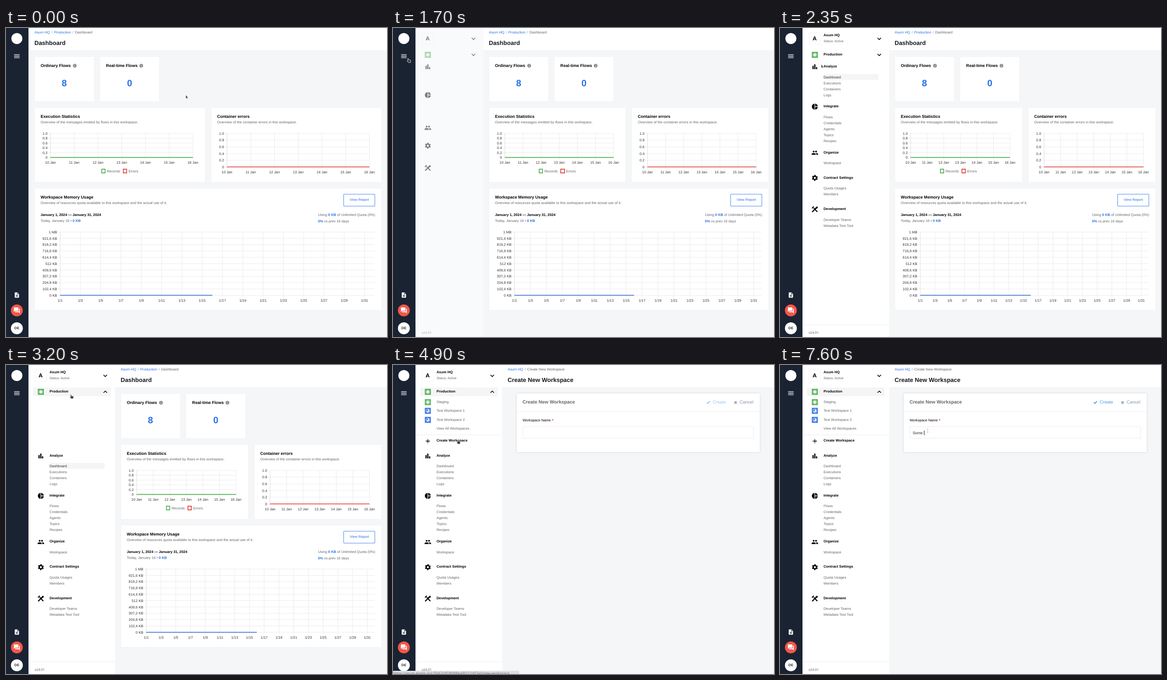
Recreate the animation shown at these times as an HTML page. Size 831 by 674 pixels, loop 8 s.

```html
<!DOCTYPE html>
<html lang="en">
<head>
<meta charset="utf-8">
<title>Dashboard</title>
<style>
@property --off { syntax: "<length>"; inherits: true; initial-value: 0px; }
@property --p { syntax: "<number>"; inherits: true; initial-value: 0; }
@property --a { syntax: "<number>"; inherits: true; initial-value: 0; }
html, body { margin: 0; width: 100%; height: 100%; overflow: hidden; }
#stage {
  position: relative; width: 831px; height: 674px; overflow: hidden; background: #f5f6f8;
  font: 7.76px "Liberation Sans", Arial, sans-serif; color: #000;
  text-rendering: geometricPrecision;
  animation: drawer 8s linear infinite;
}
#stage div, #stage svg, i { position: absolute; box-sizing: border-box; }
i { font-style: normal; line-height: 0; white-space: pre; margin-top: .2px; }
svg { overflow: visible; left: 0; top: 0; }
.b, b { font-weight: 700; }
.c { transform: translateX(-50%); }
.g { color: #63666b; }
.blue, b { color: #2970e8; }
.h { font-weight: 700; font-size: 9.05px; }
.title { font-weight: 700; font-size: 13px; color: #16181d; }
.num { font-weight: 700; font-size: 20px; color: #2970e8; }
.crumbs u { text-decoration: none; color: #2970e8; }
.crumbs s { text-decoration: none; color: #888; margin: 0 3.3px; }
#bar { left: 0; top: 0; width: 49px; height: 674px; background: #1a2332; }
#main { left: calc(49.5px + var(--off)); right: 0; top: 0; bottom: 0; }
.head { left: 0; right: 0; top: 0; height: 49px; background: #fff; box-shadow: 0 .5px 1px #eceef1; }
.fill { inset: 0; }
.card { background: #fff; box-shadow: 0 0 1px rgba(0,0,0,.08); }
.half { top: 174px; height: 161.5px; width: calc((100% - 39.5px) / 2); }
.legend { left: 0; right: 0; top: 133.5px; height: 9px; display: flex; justify-content: center; align-items: center; gap: 3px; color: #666; }
.legend span { width: 9.4px; height: 9.4px; box-shadow: inset 0 0 0 1.65px; }
.legend em { font-style: normal; margin-right: 3px; }
.axis { fill: #333; }
.btn { right: 26px; top: 362px; width: 69px; height: 27px; border: 1px solid #4a86ec; border-radius: 1px; }
#drawer {
  --k: calc(.71 + .29 * var(--p) * var(--p));
  left: 49.5px; top: 0; bottom: 0; width: var(--off); overflow: hidden;
  background: #fff; opacity: var(--a);
}
.fade { opacity: var(--p); }
.sub {
  --h: calc(.5px + 12.5px * var(--p));
  left: 45.5px; width: 120px; height: var(--h); line-height: var(--h);
  overflow: hidden; transform: translateY(-50%); color: #63666b;
}
.sel { background: #f5f5f6; color: #333; }
#groups { left: 0; top: 84px; width: 188px; height: 0; animation: expand 8s step-end infinite; }
.rule { left: 0; right: 0; border-top: 1px solid #eeeef0; }
.ver { font: 7.2px/0 "Open Sans", "Noto Sans", sans-serif; color: #555; }
#form { left: 32.5px; right: 31px; top: 62px; height: 127.5px; background: #fff; border-radius: 2px; box-shadow: 0 0 4px rgba(0,0,0,.14); }
.act { font-size: 9.7px; color: #4a98ea; }
.field { left: 12.5px; right: 13.5px; top: 72px; height: 26px; border: 1px solid #ececee; }
.typed { font-size: 8.31px; color: #222; }
.typed::after { content: ""; position: absolute; left: calc(100% + .3px); top: -5px; height: 10px; border-left: 1px solid #111; }
#status {
  left: 0; top: 666.5px; width: 275px; height: 12px; background: #dddfe2; border-radius: 0 2px 0 0;
  font: 7.7px "Noto Sans", "Open Sans", sans-serif; color: #6b6e72;
  animation: link 8s linear infinite;
}
#cursor { left: 0; top: 0; width: 0; height: 0; animation: move 8s linear infinite; }
#cursor path { fill: #3c3f44; stroke: #fff; stroke-width: .7; }
@keyframes drawer {
  0%, 20% { --off: 0px; --a: 0; --p: 0; animation-timing-function: step-end; }
  20.625% { --off: 70px; --a: .2; animation-timing-function: step-end; }
  21.25% { --off: 147px; --a: .48; animation-timing-function: step-end; }
  21.875% { --off: 178px; --a: .8; animation-timing-function: step-end; }
  22.5% { --off: 188px; --a: 1; }
  23.5% { --p: 0; }
  24.375% { --p: .13; }
  28.125%, 100% { --off: 188px; --a: 1; --p: 1; }
}
@keyframes expand { 0% { top: 84px; } 40%, 100% { top: 197.5px; } }
@keyframes link { 0%, 55.6% { opacity: 0; } 57.5%, 70.7% { opacity: 1; } 73%, 100% { opacity: 0; } }
@keyframes move {
  0%, 6.3% { transform: translate(392px, 146px); animation-timing-function: ease-in-out; }
  16.25%, 23.1% { transform: translate(33px, 66px); }
  24.375% { transform: translate(39px, 67px); }
  30.6%, 31.3% { transform: translate(102px, 82px); animation-timing-function: ease-out; }
  36.25%, 45.6% { transform: translate(141.5px, 64px); }
  47.5%, 49.4% { transform: translate(145px, 102px); }
  51.25%, 53.75% { transform: translate(145px, 142px); }
  54.375%, 64.4% { transform: translate(141px, 163px); animation-timing-function: ease-in-out; }
  70.625% { transform: translate(306.5px, 145px); }
  74.375%, 100% { transform: translate(322px, 143px); }
}
</style>
</head>
<body>
<div id="stage"></div>
<script>
const LOOP = 8000;
const ORG = 'Asum HQ';

// Text with its capitals centred on y
const t = (x, y, s, cls = '', css = '', attr = '') =>
  `<i class="${cls}" ${attr} style="left:${x}px;top:${y}px;${css}">${s}</i>`;
const on = (from, to = LOOP) => `data-on="${from} ${to}"`;
// Icon centred on x, y; placed by transform to keep fractions of a pixel
const svg = (x, y, size, body, css = '') =>
  `<svg viewBox="0 0 24 24" width="${size}" height="${size}" style="transform:translate(${x - size / 2}px,calc(${y}${typeof y === 'number' ? 'px' : ''} - ${size / 2}px));${css}">${body}</svg>`;
const fill = d => `<path d="${d}"/>`;
const line = (d, w, color = 'currentColor') => `<path d="${d}" fill="none" stroke="${color}" stroke-width="${w}"/>`;

const icons = {
  doc: fill('M14 2H6c-1.1 0-2 .9-2 2v16c0 1.1.9 2 2 2h12c1.1 0 2-.9 2-2V8l-6-6zm2 16H8v-2h8v2zm0-4H8v-2h8v2zm-3-5V3.5L18.5 9H13z'),
  chat: fill('M21 6h-2v9H6v2c0 .55.45 1 1 1h11l4 4V7c0-.55-.45-1-1-1zm-4 6V3c0-.55-.45-1-1-1H3c-.55 0-1 .45-1 1v14l4-4h10c.55 0 1-.45 1-1z'),
  bars: fill('M4 9h4v11H4zM16 13h4v7h-4zM10 4h4v16h-4z'),
  pie: fill('M11 2v20c-5-.5-9-4.8-9-10s4-9.5 9-10zm2 0v9h9c-.5-4.7-4.3-8.500-9-9zm0 11v9c4.7-.5 8.500-4.3 9-9z'),
  people: [8, 16].map(x => `<circle cx="${x}" cy="8" r="3"/>`).join('') +
    fill('M8 13c-2.3 0-7 1.2-7 3.5V19h14v-2.5c0-2.3-4.7-3.5-7-3.5zm8 0-1 .05c1.2.8 2 2 2 3.45V19h6v-2.5c0-2.3-4.7-3.5-7-3.5z'),
  gear: '<g fill="none" stroke="#000"><circle cx="12" cy="12" r="5.6" stroke-width="4.2"/><circle cx="12" cy="12" r="8.500" stroke-width="3" pathLength="12" stroke-dasharray="1" stroke-dashoffset="1.5"/></g>',
  tools: line('M3 21 13 11M8 8l12.5 12.5', 3.6) + line('M2.5 8.500 8.500 2.5M20 3l-3 3 1.5 1.5 3-3', 3.4) + line('M13 11l4-4', 4.5),
  plus: line('M12 5v14M5 12h14', 2),
  check: line('M3 12l6 6L21 5', 5),
  cross: line('M4 4l16 16M20 4L4 20', 5.5)
};

const badge = (y, color, body) => svg(26, y, 13,
  `<path fill="${color}" d="M0 0h24v24H0z"/><path fill="none" stroke="#fff" stroke-opacity=".45" d="M4 4h16v16H4z"/><circle cx="12" cy="12" r="7" fill="none" stroke="#fff" stroke-width="1.6"/>${body}`);
const green = y => badge(y, '#4caf50', '<circle cx="12" cy="12" r="4.8" fill="#fff"/>');
const azure = y => badge(y, '#2f6fe6', '<path fill="#fff" d="M12 12V7a5 5 0 1 1-4.5 7z"/>');
const chevron = (y, up, attr = '') =>
  `<div ${attr} style="right:16.5px;top:${y - 2.5}px;width:9px;height:5px"><svg width="9" height="5">${line(up ? 'M.7 4.5 4.5.8 8.300 4.5' : 'M.7.5 4.5 4.3 8.300.5', 1.6)}</svg></div>`;

// Chart whose columns stretch with the card
function plot({ left, right, top, height, cols, span, xs, ys, color, reach }) {
  const pct = i => 100 * i / span + '%';
  const grid = (coords, stroke = '#dedee0') => `<line ${coords} stroke="${stroke}" stroke-width=".6"/>`;
  let out = '';
  ys.forEach((label, i) => {
    const y = height * i / (ys.length - 1);
    out += grid(`x1="-4" x2="100%" y1="${y}" y2="${y}"`) +
      `<text class="axis" x="-6.5" y="${y + 2.7}" text-anchor="end">${label}</text>`;
  });
  cols.forEach((c, i) => {
    out += grid(`x1="${pct(c)}" x2="${pct(c)}" y1="0" y2="${height + 4}"`, i ? undefined : '#c8c8ca') +
      `<text class="axis" x="${pct(c)}" y="${height + 13.7}" text-anchor="middle">${xs[i]}</text>`;
  });
  out += `<line x1="0" x2="${pct(reach)}" y1="${height}" y2="${height}" stroke="${color}" stroke-width="1.7"/>`;
  return `<svg height="${height}" style="left:${left}px;top:${top}px;width:calc(100% - ${left + right}px)">${out}</svg>`;
}

const range = (n, f) => Array.from({ length: n }, (_, i) => f(i));
const weekPlot = (height, color) => plot({
  left: 34.3, right: 26, top: 56, height, color, span: 6, reach: 6,
  cols: range(7, i => i), xs: range(7, i => 10 + i + ' Jan'), ys: ['1.0', '0.8', '0.6', '0.4', '0.2', '0']
});
const memoryPlot = plot({
  left: 55.3, right: 14.5, top: 95, height: 138, color: '#2f66d8', span: 31, reach: 15,
  cols: range(16, i => 2 * i), xs: range(16, i => '1/' + (2 * i + 1)),
  ys: range(11, i => i ? (1024 - 102.4 * i).toFixed(1).replace('.0', '').replace('.', ',') + ' KB' : '1 MB')
});

const flowCard = (x, name, n, dot) => `<div class="card" style="left:${x}px;top:63px;width:129px;height:97px">
  ${t(13, 19, name, 'h')}${svg(dot, 19.3, 8, '<circle cx="12" cy="12" r="12" fill="#8a8a8a"/>' + line('M12 5v3M12 10.5v8', 3, '#fff'))}${t(64.5, 58, n, 'num c')}</div>`;
const crumbs = (...parts) => t(12.8, 10, parts.map((p, i) => i < parts.length - 1 ? `<u>${p}</u><s>/</s>` : p).join(''), 'crumbs g');

const dashboard = `<div class="fill" ${on(0, 4900)}>
  <div class="head">${crumbs(ORG, 'Production', 'Dashboard')}${t(12.5, 33, 'Dashboard', 'title')}</div>
  ${flowCard(13, 'Ordinary Flows', 8, 87)}${flowCard(155.6, 'Real-time Flows', 0, 90)}
  <div class="card half" style="left:13px">${t(13, 18.5, 'Execution Statistics', 'h')}
    ${t(13, 31.5, 'Overview of the messages emitted by flows in this workspace.', 'g')}${weekPlot(52.3, '#4caf50')}
    <div class="legend"><span style="color:#4caf50"></span><em>Records</em><span style="color:#e53935"></span><em style="margin:0">Errors</em></div></div>
  <div class="card half" style="right:12.5px">${t(13, 18.5, 'Container errors', 'h')}
    ${t(13, 31.5, 'Overview of the container errors in this workspace.', 'g')}${weekPlot(73, '#e53935')}</div>
  <div class="card" style="left:13px;right:12.5px;top:350px;height:265px">
    ${t(13, 18.5, 'Workspace Memory Usage', 'h')}
    ${t(13, 31.5, 'Overview of resources quota available to this workspace and the actual use of it.', 'g')}
    ${t(13, 57.5, 'January 1, 2024 — January 31, 2024', 'b')}
    ${t(13, 71, 'Today, January 16 • <b>0 KB</b>', 'g')}${memoryPlot}</div>
  <div style="left:calc(100% - 150.5px);top:0">${t(0, 408, 'Using <b>0 KB</b> of Unlimited Quota (0%)', 'g')}${t(0, 421.5, '<b>0%</b> vs prev 16 days', 'g')}</div>
  <div class="btn">${t(33.8, 12.3, 'View Report', 'blue c')}</div>
</div>`;

const typed = [['S', 6550], ['So', 7100], ['Som', 7350], ['Some', 7400], ['Some ', 7600]];
const action = attr => `<div ${attr}>${svg(418, 19.5, 9, icons.check, 'color:#4a98ea')}${t(427.5, 19.5, 'Create', 'act')}</div>`;
const form = `<div class="fill" ${on(4900)}>
  <div class="head">${crumbs(ORG, 'Create New Workspace')}${t(12.5, 33, 'Create New Workspace', 'title')}</div>
  <div id="form">${t(12.5, 19.5, 'Create New Workspace', 'b g', 'font-size:10.35px')}
    ${action(on(4900, 6550) + ' style="opacity:.55"')}${action(on(6550))}
    ${svg(477.2, 19.8, 7.5, icons.cross, 'color:#8795a3')}${t(486, 19.5, 'Cancel', 'act', 'color:#8795a3')}
    <div class="rule" style="top:39px"></div>
    ${t(12.7, 58.5, 'Workspace Name')}${t(76, 60, '*', '', 'color:#e53935;font-size:11px')}
    <div class="field"></div>
    ${typed.map(([s, at], i) => t(19.5, 85.5, s, 'typed', '', on(at, typed[i + 1]?.[1]))).join('')}</div>
</div>`;

const menu = [
  [0, 'Analyze', 'bars', ['Dashboard', 'Executions', 'Containers', 'Logs']],
  [87, 'Integrate', 'pie', ['Flows', 'Credentials', 'Agents', 'Topics', 'Recipes']],
  [187.5, 'Organize', 'people', ['Workspace']],
  [242.5, 'Contract Settings', 'gear', ['Quota Usages', 'Members']],
  [311, 'Development', 'tools', ['Developer Teams', 'Metadata Test Tool']]
];
const at = y => `calc(${y}px * var(--k))`;
const sub = (y, s, cls = '', attr = '') => `<div class="sub fade ${cls}" ${attr} style="top:${at(y)}">${s}</div>`;
const groups = menu.map(([y, name, icon, items]) =>
  svg(26, `${at(y)} + .5px`, 15.5, icons[icon]) +
  `<i class="b fade" style="left:45.5px;top:${at(y)}">${name}</i>` +
  items.map((s, i) => sub(y + 22.7 + 12.95 * i, s)).join('')).join('') +
  sub(22.7, 'Dashboard', 'sel', on(0, 4900));

const drawer = `<div id="drawer">
  <div ${on(2850)} style="left:9px;width:169px;top:48.5px;height:19px;background:#f5f5f6"></div>
  <div style="left:13px;top:10px;width:26px;height:26px;border:1px solid #f2f2f4"></div>
  ${t(26, 23, 'A', 'b c', 'font-size:12.5px')}
  ${t(45.5, 16, ORG, 'b fade')}${t(45.5, 29, 'Status: Active', 'g fade', 'font-size:7.2px')}
  ${chevron(23)}${chevron(58.3, false, on(0, 3200))}${chevron(58, true, on(3200))}
  ${green(58.5)}${t(45.5, 58, 'Production', 'b fade')}
  <div class="fill" ${on(3550)}>
    ${green(81)}${azure(100)}${azure(119.7)}
    ${['Staging', 'Test Workspace 1', 'Test Workspace 2', 'View All Workspaces'].map((s, i) => t(45.5, 80.5 + 19.5 * i, s, 'g')).join('')}
    <div class="rule" style="top:152px"></div>
    ${svg(26, 166, 15.5, icons.plus)}${t(45.5, 165.3, 'Create Workspace', 'b')}</div>
  ${t(45.5, 100, 'Test Workspace 1', '', '', on(3800, 4050))}${t(45.5, 139, 'View All Workspaces', '', '', on(4100, 4350))}
  <div id="groups">${groups}</div>
  <div class="rule fade" style="top:647px"></div>${t(13, 664.5, 'v24.01', 'ver')}
</div>`;

const disc = (y, r, color) => `<svg width="1" height="1"><circle cx="23.7" cy="${y}" r="${r}" fill="${color}"/></svg>`;
const bar = `<div id="bar">${disc(23, 12, '#fff')}
  ${svg(23.7, 61.5, 16, line('M3 7h18M3 12h18M3 17h18', 2.1, '#fff'))}
  ${svg(23.7, 582.5, 14, icons.doc, 'fill:#fff')}
  ${disc(616, 13, '#f2564a')}${svg(23.7, 616, 15.5, icons.chat, 'fill:#fff')}
  ${disc(655, 13, '#fff')}${t(23.7, 654.5, 'DE', 'b c', 'color:#333')}</div>`;

const shape = (d, ...spans) => spans.map(([a, b]) => `<svg width="1" height="1" ${on(a, b)}><path d="${d}"/></svg>`).join('');
const cursor = `<div id="cursor">
  ${shape('M0 0V8l1.7-1.5L3 9.3l1.4-.6L3.2 6H5.4z', [0, 1250], [1800, 2750], [5250, 5500])}
  ${shape('M-.8.3Q.2-.3.7.7L1.5 3.3 4.5 3.7Q6 4 5.8 5.5L5.2 9.5H.7L-2.5 5.8Q-2.3 4.4-.5 5.3L-1.2 1.5z', [1250, 1800], [2750, 5250])}
  ${shape('M-1.7-4.3H1.7V-3.5H.5V3.5H1.7V4.3H-1.7V3.5H-.5V-3.5H-1.7z', [5500, LOOP])}</div>`;

document.getElementById('stage').innerHTML =
  `<div id="main">${dashboard}${form}</div>${drawer}${bar}
  <div id="status">${t(1, 6.3, 'https://asum.elastic.io/c/5b62c919fd98ea00112d53ad/new-workspace')}</div>${cursor}`;

// Hard on/off switches
for (const el of document.querySelectorAll('[data-on]')) {
  const [from, to] = el.dataset.on.split(' ').map(Number);
  const key = (ms, visibility) => ({ offset: ms / LOOP, visibility, easing: 'step-end' });
  const keys = [];
  if (from > 0) keys.push(key(0, 'hidden'));
  keys.push(key(from, 'visible'));
  if (to < LOOP) keys.push(key(to, 'hidden'));
  keys.push(key(LOOP, to < LOOP ? 'hidden' : 'visible'));
  el.animate(keys, { duration: LOOP, iterations: Infinity });
}
</script>
</body>
</html>
```
